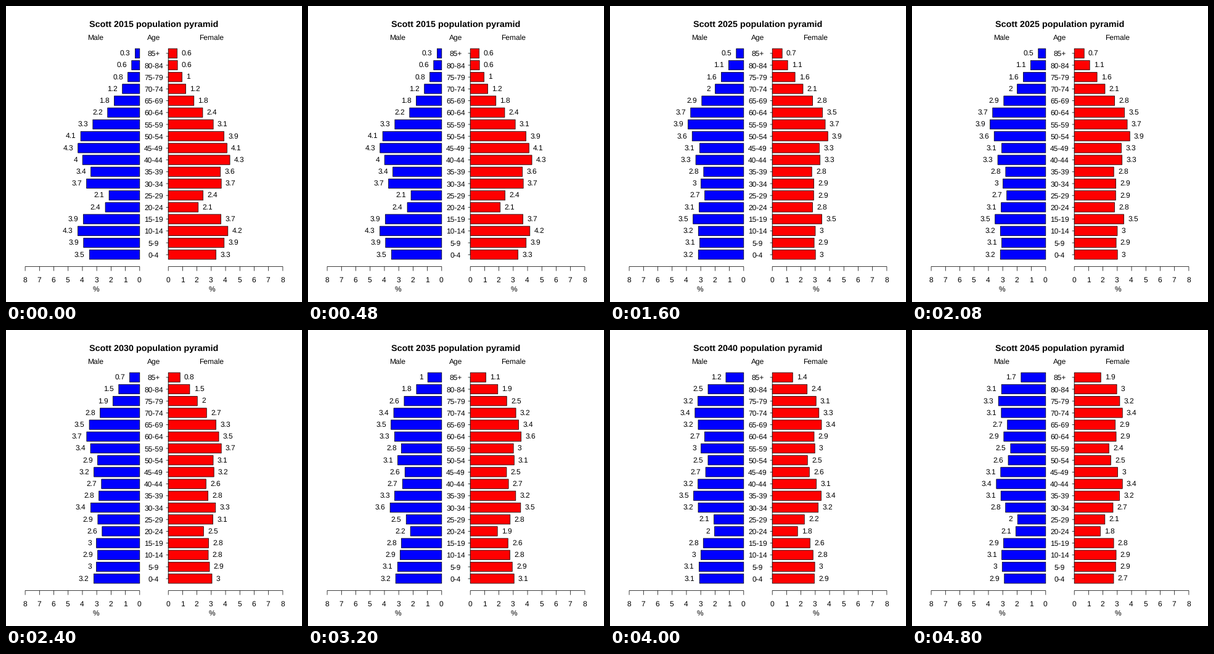
A matplotlib script for the animation above (5600 ms loop, 480 px wide and 480 px high).

```python
import matplotlib.pyplot as plt
import numpy as np
from matplotlib.animation import FuncAnimation
from matplotlib.patches import Rectangle

plt.rcParams["font.family"] = "Liberation Sans"
plt.rcParams["font.size"] = 12
plt.rcParams["text.hinting"] = "none"

SIZE, DPI = 480, 72
MID = SIZE / 2
UNIT = 23.21           # pixels per percent; the half gap is one unit
BASE, STEP = 422.4, 19.2
BAR = 0.8 * STEP
LINE = dict(color="black", lw=0.75, snap=False)
YEARS = range(2015, 2050, 5)

AGES = [f"{a}-{a + 4}" for a in range(0, 85, 5)] + ["85+"]
GROUP = np.arange(len(AGES))

# Starting shares in percent, youngest group first.
MEN = np.array([3.51, 3.92, 4.32, 3.94, 2.40, 2.14, 3.71, 3.41, 3.99,
                4.31, 4.12, 3.27, 2.24, 1.78, 1.21, 0.83, 0.56, 0.32])
WOMEN = np.array([3.33, 3.90, 4.16, 3.68, 2.09, 2.43, 3.70, 3.64, 4.30,
                  4.10, 3.89, 3.14, 2.40, 1.79, 1.22, 0.96, 0.64, 0.62])

# Net migration between the ages of 10 and 30, by group left behind.
MEN_MOVES = {3: -0.873, 4: -0.053, 5: 0.96}
WOMEN_MOVES = {2: -0.063, 3: -0.98, 4: 0.503, 5: 0.627}


def grow_older(people, moves, decline, oldest):
    """Move every group up one step; the last one is open-ended."""
    alive = people * (1 - decline * np.maximum(GROUP - 9, 0) ** 2)
    alive[-2:] = people[-2:] * oldest
    for group, count in moves.items():
        alive[group] += count
    older = np.roll(alive, 1)
    older[-1] += alive[-1]
    older[0] = 0
    return older


def project():
    """Shares (men, women) for each year."""
    men, women = MEN, WOMEN
    shares = []
    for _ in YEARS:
        scale = 100 / (men.sum() + women.sum())
        shares.append((men * scale, women * scale))
        mothers = women[4:8].sum()
        men = grow_older(men, MEN_MOVES, 0.0006, 0.468)
        women = grow_older(women, WOMEN_MOVES, 0.0004, 0.488)
        mothers = (mothers + women[4:8].sum()) / 2
        men[0] = 0.285 * mothers
        women[0] = 0.951 * men[0]
    return shares


fig = plt.figure(figsize=(SIZE / DPI, SIZE / DPI), dpi=DPI, facecolor="white")
ax = fig.add_axes([0, 0, 1, 1])
ax.set_xlim(0, SIZE)
ax.set_ylim(SIZE, 0)
ax.axis("off")


def line(x0, y0, x1, y1):
    ax.plot([x0, x1], [y0, y1], solid_capstyle="butt", **LINE)


def label(x, y, text, ha="center", **style):
    return ax.text(x - 0.5, y, text, ha=ha, va="baseline", **style)


def row_y(i):
    return BASE - STEP * (i + 1)


def draw_side(sign, name):
    """Percent axis and captions of one half; sign is -1 left, 1 right."""
    zero = MID + sign * UNIT
    line(zero, BASE, zero + sign * 8 * UNIT, BASE)
    for n in range(9):
        x = zero + sign * n * UNIT
        line(x, BASE, x, BASE + 7.2)
        label(x, 448.3, str(n))
    label(MID + sign * 94, 55, name)
    label(MID + sign * 94, 463, "%")


def draw_ages():
    zero = MID + UNIT
    line(zero, row_y(0), zero, row_y(GROUP[-1]))
    for i, age in enumerate(AGES):
        line(zero - 3.6, row_y(i), zero, row_y(i))
        label(MID, row_y(i) + 4.4, age)
    label(MID, 55, "Age")


def make_bars(sign, color):
    """One (rectangle, value text) pair per age group."""
    pairs = []
    for i in GROUP:
        bar = Rectangle((MID + sign * UNIT, row_y(i) - BAR / 2), 0, BAR,
                        facecolor=color, edgecolor="black", lw=0.75,
                        snap=False, joinstyle="round", zorder=3)
        ax.add_patch(bar)
        text = label(0, row_y(i) + 3.2, "", "left" if sign > 0 else "right")
        pairs.append((bar, text))
    return pairs


def set_bars(pairs, sign, values):
    for (bar, text), value in zip(pairs, values):
        bar.set_width(sign * value * UNIT)
        text.set_x(MID - 0.5 + sign * ((1 + value) * UNIT + 7.2))
        text.set_text(f"{round(value, 1):g}")


shares = project()
draw_side(-1, "Male")
draw_side(1, "Female")
draw_ages()
title = label(MID, 34, "", fontsize=14.4, fontweight="bold")
males = make_bars(-1, "#0000ff")
females = make_bars(1, "#ff0000")


def update(k):
    title.set_text(f"Scott {YEARS[k]} population pyramid")
    men, women = shares[k]
    set_bars(males, -1, men)
    set_bars(females, 1, women)
    return []


anim = FuncAnimation(fig, update, frames=len(YEARS), interval=800,
                     repeat=True, repeat_delay=0, blit=False)
plt.show()
```
